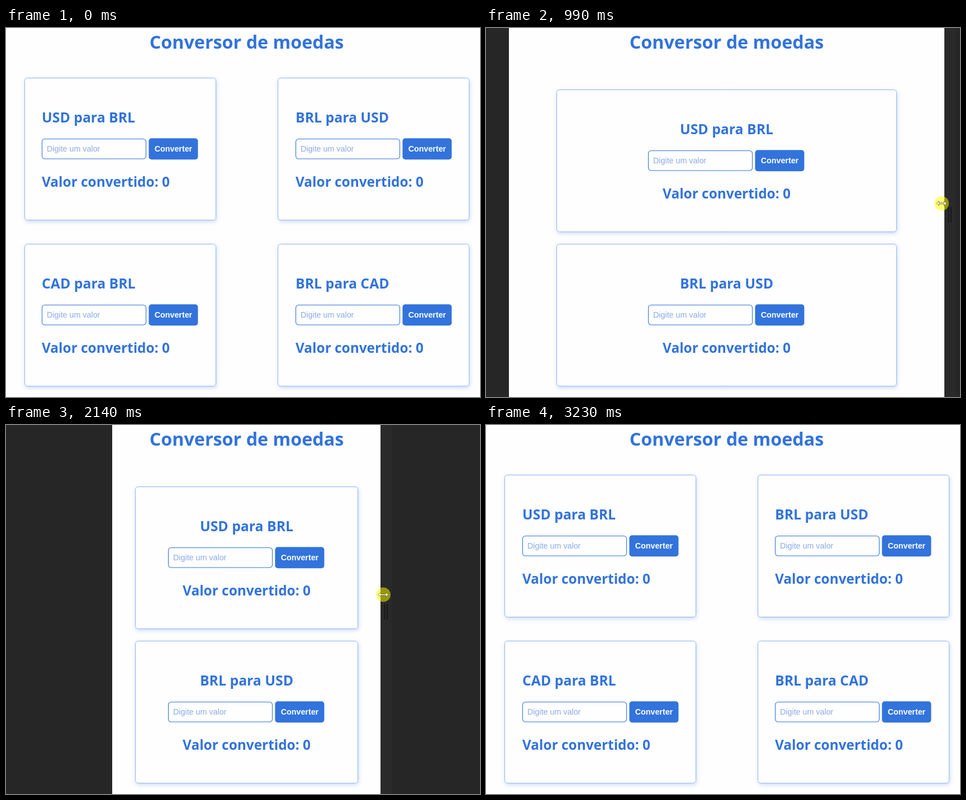
These frames come from a looping animation (848 px wide and 660 px high, 3460 ms). An HTML page with a canvas:

```html
<!DOCTYPE html>
<html lang="pt">
<head>
<meta charset="utf-8">
<title>Conversor de moedas</title>
<style>
html, body { margin: 0; width: 100%; height: 100%; overflow: hidden; background: #262626; }
canvas { display: block; }
</style>
</head>
<body>
<canvas id="stage" width="848" height="660"></canvas>
<script>
const ctx = document.getElementById('stage').getContext('2d');
const LOOP = 3460, DRAG_START = 500, STEP = 48.4;
const MID = 430.5, BREAKPOINT = 800, CARD_W = 343, CARD_H = 254;
const BLUE = '#3273dc', PAGE = '#fefefe';
const HEAD = '"Open Sans", "Noto Sans", sans-serif';
const BODY = '"Liberation Sans", Arial, sans-serif';
const TITLES = ['USD para BRL', 'BRL para USD', 'CAD para BRL', 'BRL para CAD'];

// Page width at a few steps of the drag: narrow, rest, widen
const WIDTHS = [
  [-1, 906.4], [0, 905.6], [10, 779], [21, 535], [26, 463],
  [28, 443], [31, 443], [40, 648], [46, 816], [54, 905.6]
];

function stepAt(t) {
  const k = Math.floor((t - DRAG_START) / STEP + .4);
  return Math.min(54, Math.max(-1, k));
}

const rate = i => (WIDTHS[i + 1][1] - WIDTHS[i][1]) / (WIDTHS[i + 1][0] - WIDTHS[i][0]);

function slope(i) {
  if (i === 0 || i === WIDTHS.length - 1) return 0;
  const a = rate(i - 1), b = rate(i);
  return a * b > 0 ? 2 * a * b / (a + b) : 0;
}

// Monotone cubic through the key widths
function pageWidth(k) {
  let i = 0;
  while (i < WIDTHS.length - 2 && k >= WIDTHS[i + 1][0]) i++;
  const [k0, w0] = WIDTHS[i], [k1, w1] = WIDTHS[i + 1];
  const h = k1 - k0, u = (k - k0) / h, v = 1 - u;
  return w0 * (1 + 2 * u) * v * v + w1 * (3 - 2 * u) * u * u
    + h * u * v * (slope(i) * v - slope(i + 1) * u);
}

function smooth(u) {
  u = Math.min(1, Math.max(0, u));
  return u * u * (3 - 2 * u);
}

function box(x, y, w, h) {
  ctx.beginPath();
  ctx.roundRect(x, y, w, h, 5);
}

function text(str, x, y, font, color = BLUE, align = 'left') {
  ctx.font = font;
  ctx.fillStyle = color;
  ctx.textAlign = align;
  ctx.fillText(str, x, y);
}

function card(x, y, w, title, centered) {
  const left = Math.round(x + .2), width = Math.round(w);
  ctx.save();
  ctx.shadowColor = 'rgba(50,115,220,.26)';
  ctx.shadowBlur = 7;
  ctx.shadowOffsetX = 1;
  ctx.shadowOffsetY = 2.5;
  ctx.fillStyle = PAGE;
  box(left, y, width, CARD_H + 1);
  ctx.fill();
  ctx.restore();
  ctx.lineWidth = 1;
  ctx.strokeStyle = '#92b5ee';
  box(left + .5, y + .5, width - 1, CARD_H);
  ctx.stroke();

  const tx = Math.round(centered ? MID - 140.2 : x + 32);
  const align = centered ? 'center' : 'left';
  const headX = centered ? MID : tx;
  text(title, headX, y + 80, `700 24.8px ${HEAD}`, BLUE, align);
  text('Valor convertido: 0', headX, y + 195, `700 24.4px ${HEAD}`, BLUE, align);

  ctx.lineWidth = 1.1;
  ctx.strokeStyle = BLUE;
  box(tx + .5, y + 109.5, 186, 35.5);
  ctx.stroke();
  text('Digite um valor', tx + 9, y + 132, `14.3px ${BODY}`, '#8aabe8');

  ctx.fillStyle = BLUE;
  box(tx + 191.4, y + 108.3, 88, 38);
  ctx.fill();
  text('Converter', tx + 235.4, y + 132, `bold 14.3px ${BODY}`, '#fff', 'center');
}

function cards(width) {
  if (width > BREAKPOINT) {
    const gap = (width - 2 * CARD_W) / 4;
    const offset = CARD_W / 2 + gap;
    TITLES.forEach((title, i) => {
      const center = MID + (i % 2 ? offset : -offset);
      card(center - CARD_W / 2, i < 2 ? 89 : 386, CARD_W, title, false);
    });
  } else {
    const w = width * .7 + 63.4;
    TITLES.slice(0, 2).forEach((title, i) => card(MID - w / 2, 110 + i * 276, w, title, true));
  }
}

// Highlighted horizontal resize cursor
function pointer(x, y) {
  ctx.fillStyle = 'rgba(255,255,0,.5)';
  ctx.beginPath();
  ctx.arc(x, y, 13, 0, Math.PI * 2);
  ctx.fill();

  ctx.beginPath();
  for (const s of [1, -1]) {
    for (const [px, py] of [[-4.5, -1], [-4.5, -4], [-9, 0], [-4.5, 4], [-4.5, 1]]) {
      ctx.lineTo(x + s * px, y + s * py);
    }
  }
  ctx.closePath();
  ctx.fillStyle = '#fff';
  ctx.strokeStyle = '#84840f';
  ctx.lineWidth = 1;
  ctx.fill();
  ctx.stroke();
}

function draw(time) {
  const k = stepAt(time % LOOP);
  const width = pageWidth(k);
  const left = Math.floor(MID - width / 2), right = Math.floor(MID + width / 2);

  ctx.fillStyle = '#262626';
  ctx.fillRect(0, 0, 848, 660);
  ctx.fillStyle = '#2a2a2a';
  ctx.fillRect(right, 0, 20, 660);
  ctx.fillStyle = '#191919';
  for (const dx of [6.5, 11]) ctx.fillRect(right + dx, 320, 2, 28);
  ctx.fillStyle = PAGE;
  ctx.fillRect(left, 0, right - left, 660);

  text('Conversor de moedas', MID, 37, `700 32.3px ${HEAD}`, BLUE, 'center');
  cards(width);

  // The pointer trails the edge inward and leads it outward
  pointer(right - 5 + 20 * smooth((k - 28) / 12), 318 - .43 * k);
}

const start = performance.now();
function tick() {
  draw(performance.now() - start);
  requestAnimationFrame(tick);
}
tick();
</script>
</body>
</html>
```
